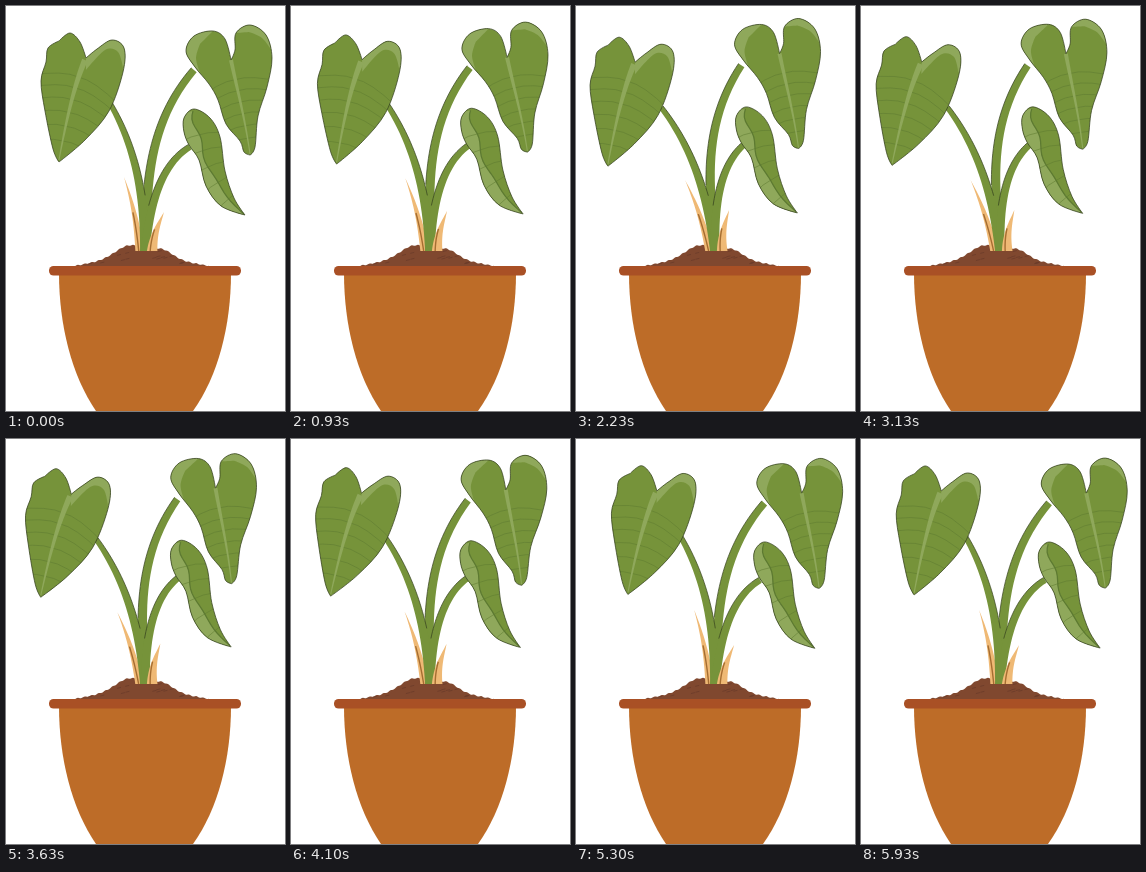
Recreate the animation shown at these times as an HTML page. Size 279 by 405 pixels, loop 6010 ms.

```html
<!DOCTYPE html>
<html lang="en">
<head>
<meta charset="utf-8">
<title>Swaying potted plant</title>
<style>
html, body { margin: 0; width: 100%; height: 100%; overflow: hidden; background: #fff; }
svg { display: block; width: 100vw; height: 100vh; }
</style>
</head>
<body>
<svg id="stage" viewBox="0 0 279 405"></svg>
<script>
const NS = 'http://www.w3.org/2000/svg';
const stage = document.getElementById('stage');
const GREEN = '#76933a', LIGHT = '#8fa85b', VEIN = '#5d7a31', EDGE = '#35411f';
const SAND = '#efb975', BARK = '#a56d31';

function add(parent, tag, attrs = {}) {
  const el = document.createElementNS(NS, tag);
  for (const key in attrs) el.setAttribute(key, attrs[key]);
  parent.appendChild(el);
  return el;
}
const fill = (parent, d, color) => add(parent, 'path', { d, fill: color });
const line = (parent, d, color, width, opacity = 1) => add(parent, 'path', {
  d, fill: 'none', stroke: color, 'stroke-width': width, 'stroke-linejoin': 'round', opacity
});
const pathOf = pts => 'M' + pts.map(p => p.map(v => v.toFixed(2)).join(' ')).join('L');
const parse = text => text.split(' ').map(s => s.split(',').map(parseFloat));

// Smooth closed curve through key points; sharp corners end in "!".
function smooth(text) {
  const pts = parse(text), n = pts.length;
  const sharp = text.split(' ').map(s => s.endsWith('!'));
  const at = i => pts[(i + n) % n];
  const handle = (i, side) => at(i).map((v, c) =>
    v + (sharp[i % n] ? 0 : side / 6) * (at(i + 1)[c] - at(i - 1)[c]));
  return 'M' + pts[0] + pts.map((p, i) =>
    `C${handle(i, 1)} ${handle(i + 1, -1)} ${at(i + 1)}`).join('') + 'Z';
}

// Cubic curve as a function: point at t, pushed sideways by off (right is positive going up).
function curve(text, wobble = 0) {
  const [a, b, c, d] = parse(text);
  const mix = (t, i) => (1 - t) ** 3 * a[i] + 3 * t * (1 - t) ** 2 * b[i] + 3 * t * t * (1 - t) * c[i] + t ** 3 * d[i];
  const slope = (t, i) => (1 - t) ** 2 * (b[i] - a[i]) + 2 * t * (1 - t) * (c[i] - b[i]) + t * t * (d[i] - c[i]);
  return (t, off = 0, along = 0) => {
    const dx = slope(t, 0), dy = slope(t, 1), len = Math.hypot(dx, dy);
    const push = off + wobble * (1 - t) * Math.sin(5 * Math.PI * t);
    return [mix(t, 0) + (along * dx - push * dy) / len, mix(t, 1) + (along * dy + push * dx) / len];
  };
}

function trace(at, offset, from = 0, to = 1) {
  return Array.from({ length: 25 }, (_, i) => {
    const t = from + (to - from) * i / 24;
    return at(t, offset(t));
  });
}

function strand(parent, at, w0, w1, color) {
  const half = t => (w0 + (w1 - w0) * t) / 2;
  fill(parent, pathOf([...trace(at, half), ...trace(at, t => -half(t)).reverse()]) + 'Z', color);
  return half;
}

// Soil: a low arch with two humps
const SOIL_LEFT = 68, SOIL_WIDTH = 135;
const hump = (x, mid, spread) => Math.exp(-(((x - mid) / spread) ** 2));
const soilTop = x => 260 - 8 * Math.sin(Math.PI * (x - SOIL_LEFT) / SOIL_WIDTH)
  - 13 * hump(x, 124, 20) - 9 * hump(x, 156, 15) - 0.5 * Math.sin(x * 0.9);

let seed = 7;
const random = () => (seed = seed * 16807 % 2147483647) / 2147483647;

fill(stage, 'M53 267C53 320 66 370 90 405H187C212 370 225 320 225 267Z', '#bd6c28');
const soil = Array.from({ length: SOIL_WIDTH + 1 }, (_, i) => [SOIL_LEFT + i, soilTop(SOIL_LEFT + i)]);
fill(stage, pathOf([...soil, [203, 262], [68, 262]]) + 'Z', '#80482f');
for (let i = 0; i < 16; i++) {
  const x = 82 + 100 * random(), y = soilTop(x) + 2 + random() * (256 - soilTop(x));
  line(stage, `M${x} ${y}l4 -1`, '#6b3c2a', 0.8);
}
add(stage, 'rect', { x: 43, y: 260, width: 192, height: 9.5, rx: 4.5, fill: '#a95025' });

// Stems and shoots, cut off at the soil line
add(add(stage, 'clipPath', { id: 'ground' }), 'rect', { width: 279, height: 245 });
const stems = add(add(stage, 'g', { 'clip-path': 'url(#ground)' }), 'g');

function stem(points, w0, w1, darkSide) {
  const at = curve(points), half = strand(stems, at, w0, w1, GREEN);
  line(stems, pathOf(trace(at, t => darkSide * half(t), 0.35)), EDGE, 0.7);
}
function shoot(points, width, streak) {
  const at = curve(points);
  strand(stems, at, width, 0, SAND);
  line(stems, pathOf(trace(at, () => streak, 0, 0.5)), BARK, 1.4);
}
shoot('134,248 131,215 126,195 118,171', 9, -1);
stem('140,248 140,180 142,118 188,64', 10, 7, -1);
stem('139,248 139,190 129,140 103,96', 10, 5, 1);
stem('139,248 143,200 155,158 184,141', 9, 6, -1);
shoot('146,248 147,228 153,218 158,206', 11, -2);

function leaf(id, { outline, lights, rib, veins }) {
  const g = add(stage, 'g'), d = smooth(outline);
  add(add(g, 'clipPath', { id }), 'path', { d });
  fill(g, d, GREEN);
  const inner = add(g, 'g', { 'clip-path': `url(#${id})` });
  lights.forEach(p => fill(inner, p, LIGHT));
  for (let i = 1; i <= veins; i++) {
    const t = 0.1 + 0.75 * i / veins;
    for (const side of [-1, 1]) {
      line(inner, `M${rib(t)}Q${rib(t, 16 * side, -2)} ${rib(t, 48 * side, 14)}`, VEIN, 0.7, 0.75);
    }
  }
  line(g, d, EDGE, 0.75);
  return inner;
}

const leftRib = curve('79,54 69,77 61,110 53,154');
const left = leaf('left', {
  outline: '80,52! 74,36 64,27 53,35! 42,42 40,56 35,75 39,105 47,143 53,156! 79,134 103,105 117,66 118,42 106,34 91,43',
  lights: [smooth('80,52! 91,43 106,33 120,42 117,62! 112,46 99,44 80,64!')],
  rib: leftRib, veins: 6
});
strand(left, leftRib, 6, 1, LIGHT);

const rightRib = curve('225,54 231,83 239,112 244,148');
const right = leaf('right', {
  outline: '225,54! 219,33 207,25 188,30 180,45 189,61 203,78 212,94 220,118 234,135 238,146 244,149! 249,141 252,110 261,81 266,52 260,29 244,19 230,27 229,44',
  lights: [
    smooth('207,25! 190,28 178,42 183,56 194,67! 190,52 194,38!'),
    smooth('230,27! 244,17 262,27 266,45! 256,32 243,26!')
  ],
  rib: rightRib, veins: 6
});
strand(right, rightRib, 4, 1, LIGHT);

const middleRib = curve('187,105 193,135 200,175 238,208', 3);
const middle = leaf('middle', {
  outline: '178,126 178,112 188,103 204,112 214,131 219,165 228,192 239,209! 215,200 200,180 193,154 183,139',
  lights: [pathOf([...trace(middleRib, () => 0), ...trace(middleRib, () => 40).reverse()]) + 'Z'],
  rib: middleRib, veins: 5
});
line(middle, pathOf(trace(middleRib, () => 0)), VEIN, 1.3);

const LOOP = 6010, STEPS = 120, REST = 112, LAG = 30;
const wave = k => Math.cos(2 * Math.PI * (k - REST) / STEPS);

// Poses alternate between 30 ms and 70 ms holds.
function stepAt(t) {
  const pair = Math.min(59, Math.floor(t / 100));
  return 2 * pair + (t - pair * 100 >= 30 ? 1 : 0);
}

// Leaves drift with the stems; their tilt follows a quarter cycle later.
function sway(el, k, dx, dy, tilt, pivot) {
  const drift = (wave(0) - wave(k)) / 1.763;
  const trail = wave(-LAG) - wave(k - LAG);
  el.setAttribute('transform',
    `translate(${dx * drift} ${dy * drift}) rotate(${tilt * trail} ${pivot})`);
}

function draw(t) {
  const k = stepAt(t);
  stems.setAttribute('transform', `rotate(${-6.7 * (wave(0) - wave(k)) / 1.763} 139 245)`);
  sway(left.parentNode, k, -20, 4, 1.5, '77 75');
  sway(right.parentNode, k, -20.5, -6.2, 1.4, '228 65');
  sway(middle.parentNode, k, -16.8, -2, 0.6, '205 150');
}

const start = performance.now();
function tick() {
  draw((performance.now() - start) % LOOP);
  requestAnimationFrame(tick);
}
tick();
</script>
</body>
</html>
```
